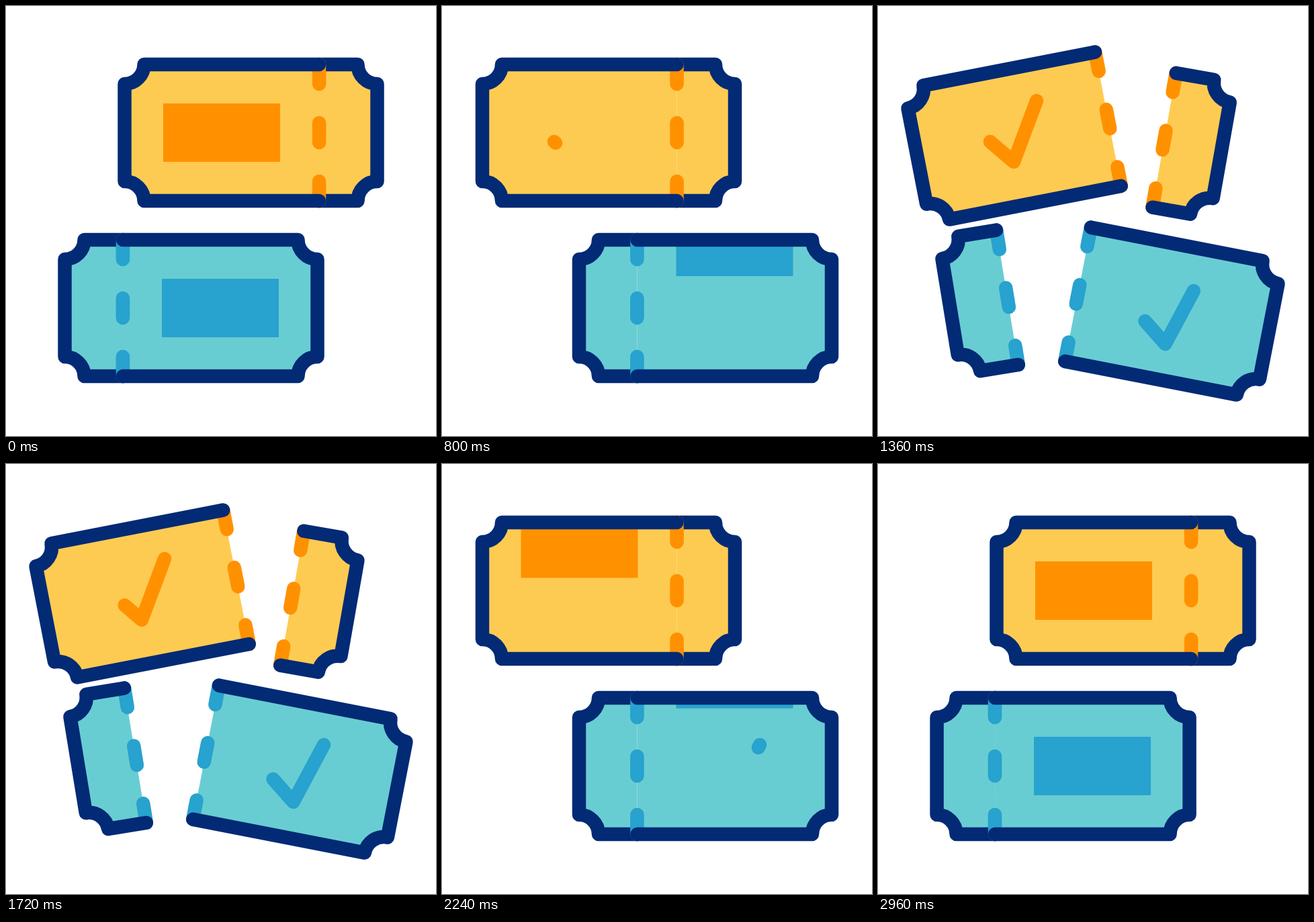
Recreate the animation shown at these times as an HTML page with a canvas. Size 640 by 640 pixels, loop 3000 ms.

```html
<!DOCTYPE html>
<html lang="en">
<head>
<meta charset="utf-8">
<title>Tickets</title>
<style>
  html, body { margin: 0; height: 100%; overflow: hidden; background: #fff; }
  canvas { display: block; }
</style>
</head>
<body>
<canvas id="stage" width="640" height="640"></canvas>
<script>
const ctx = document.getElementById('stage').getContext('2d');
const FRAME_MS = 40, FRAMES = 75;
const NAVY = '#032a75', LINE = 20.5;
const HALF = 101.5, NOTCH = 29, BODY = 289.5, STUB = 86.5, SLIDE = 116.5;

// Times are [start, length] in frames. The dir -1 ticket is mirrored.
const tickets = [
  {
    x: 466, y: 188.5, dir: 1, fill: '#fecb52', accent: '#ff9100',
    go: [2, 12], back: [57, 16], tear: [20, 9.5], mend: [42.7, 8.5],
    label: [[13, 7], [51, 9]], tick: [[19, 12], [40.8, 12]],
    stub: { x: 76.5, y: 11.25, bow: 7, turn: 10 },
    mark: [[167, 202], [202, 232], [236, 141]]
  },
  {
    x: 174, y: 449.5, dir: -1, fill: '#68cdd2', accent: '#28a2ce',
    go: [5, 12], back: [60.5, 14], tear: [23, 9.5], mend: [46.1, 8.5],
    label: [[16, 7], [53.9, 9]], tick: [[23.6, 12], [45.3, 12]],
    stub: { x: 98, y: -15.75, bow: 10, turn: 9.3 },
    mark: [[397.5, 469], [427.5, 503], [473, 418]]
  }
];

const progress = (f, [start, length]) => Math.min(1, Math.max(0, (f - start) / length));

function smooth(f, span) {
  const t = progress(f, span);
  return t * t * (3 - 2 * t);
}

// Quick start and long tail: cubic-bezier(.2, 0, .12, 1), solved by bisection.
function settle(f, span) {
  const t = progress(f, span);
  if (t === 0 || t === 1) return t;
  let lo = 0, hi = 1, u;
  for (let i = 0; i < 24; i++) {
    u = (lo + hi) / 2;
    const v = 1 - u;
    const x = 3 * u * v * v * 0.2 + 3 * u * u * v * 0.12 + u * u * u;
    if (x < t) lo = u; else hi = u;
  }
  return u * u * (3 - 2 * u);
}

// Outline open at the perforation, which runs through x = 0.
function outline(width) {
  const path = new Path2D();
  path.moveTo(0, -HALF);
  path.arc(-width, -HALF, NOTCH, 0, Math.PI / 2);
  path.arc(-width, HALF, NOTCH, -Math.PI / 2, 0);
  path.lineTo(0, HALF);
  return path;
}
const bodyPath = outline(BODY), stubPath = outline(STUB);

function drawPiece(path, ticket, x, y, turn, flip, labelY) {
  ctx.save();
  ctx.translate(x, y);
  ctx.rotate(turn * Math.PI / 180);
  ctx.scale(flip, 1);
  ctx.fillStyle = ticket.fill;
  ctx.fill(path);

  if (labelY !== undefined) {
    ctx.save();
    ctx.clip(path);
    ctx.fillStyle = ticket.accent;
    ctx.fillRect(-232, -43.5 + labelY, 174, 87);
    ctx.restore();
  }

  ctx.strokeStyle = ticket.accent;
  ctx.setLineDash([NOTCH, NOTCH * 2]);
  ctx.beginPath();
  ctx.moveTo(0, -HALF);
  ctx.lineTo(0, HALF);
  ctx.stroke();

  ctx.setLineDash([]);
  ctx.strokeStyle = NAVY;
  ctx.stroke(path);
  ctx.restore();
}

function drawMark({ mark, accent }, from, to) {
  if (to <= from) return;
  const [a, b, c] = mark;
  const length = Math.hypot(b[0] - a[0], b[1] - a[1]) + Math.hypot(c[0] - b[0], c[1] - b[1]);
  ctx.save();
  ctx.strokeStyle = accent;
  ctx.setLineDash([(to - from) * length, 999]);
  ctx.lineDashOffset = -from * length;
  ctx.beginPath();
  mark.forEach(p => ctx.lineTo(...p));
  ctx.stroke();
  ctx.restore();
}

function drawTicket(k, f) {
  const slide = SLIDE * (smooth(f, k.go) - settle(f, k.back));
  const open = smooth(f, k.tear) - smooth(f, k.mend);
  const hidden = smooth(f, k.label[0]) - smooth(f, k.label[1]);
  const s = k.stub;

  ctx.save();
  ctx.translate(k.x, k.y);
  ctx.scale(k.dir, 1);
  ctx.translate(-slide, 0);
  drawPiece(stubPath, k, s.x * open, s.y * open + s.bow * open * (1 - open), s.turn * open, -1);
  drawPiece(bodyPath, k, -7 * open, -20.25 * open, -11 * open, 1, -150 * hidden);
  ctx.restore();

  drawMark(k, smooth(f, k.tick[1]), smooth(f, k.tick[0]));
}

function draw() {
  const f = Math.floor(performance.now() / FRAME_MS) % FRAMES;
  ctx.fillStyle = '#fff';
  ctx.fillRect(0, 0, 640, 640);
  ctx.lineWidth = LINE;
  ctx.lineCap = ctx.lineJoin = 'round';
  tickets.forEach(k => drawTicket(k, f));
  requestAnimationFrame(draw);
}
draw();
</script>
</body>
</html>
```
